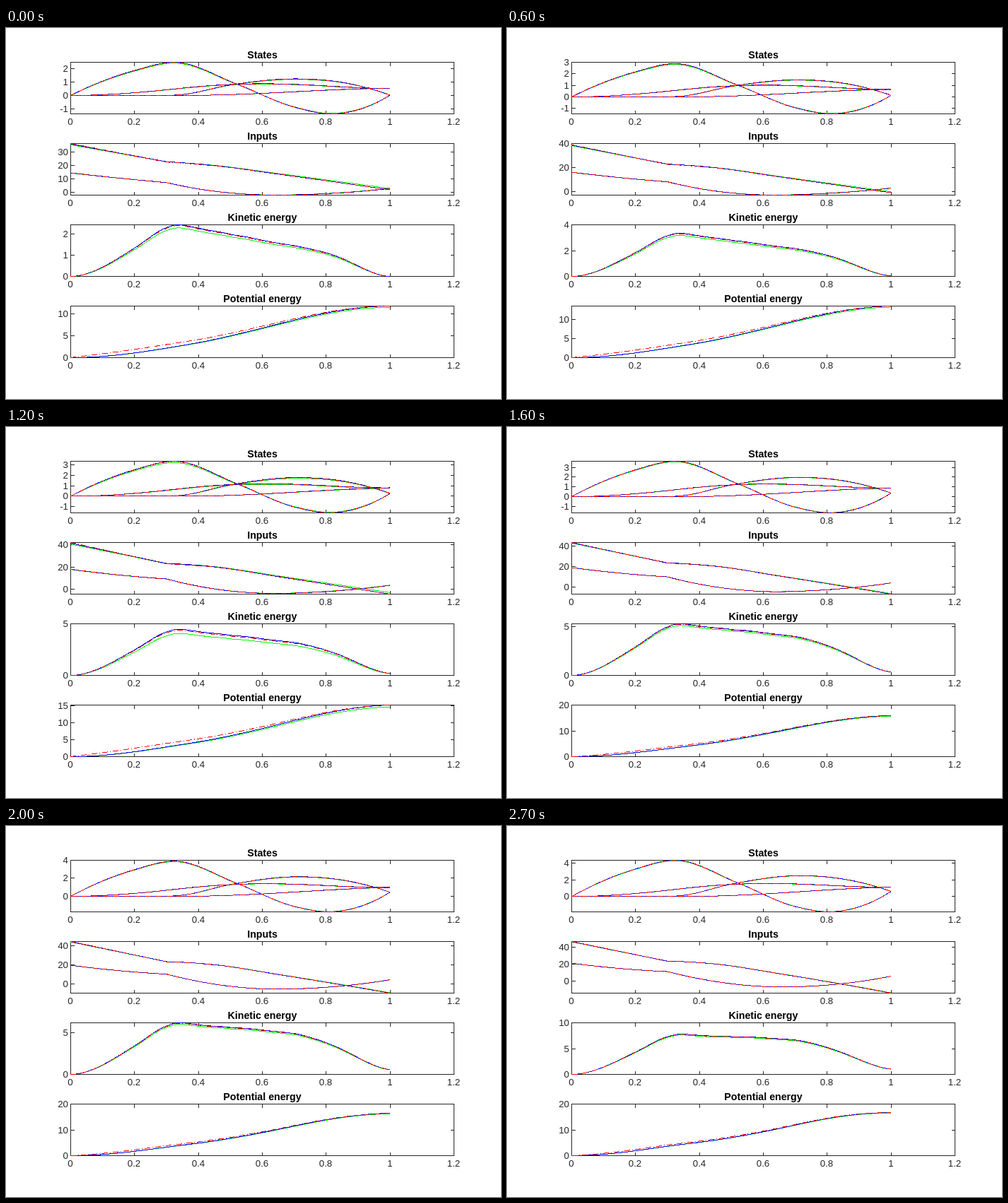
Recreate the animation shown at these times as an HTML page. Size 700 by 525 pixels, loop 2900 ms.

```html
<!DOCTYPE html>
<html lang="en">
<head>
<meta charset="utf-8">
<title>Two-link arm trajectories</title>
<style>
html, body { margin: 0; width: 700px; height: 525px; overflow: hidden; background: #fff; }
svg { display: block; }
path { fill: none; stroke-width: 1; shape-rendering: crispEdges; }
text { font: 13.3px "Liberation Sans", Arial, sans-serif; fill: #262626; text-anchor: middle; }
.title { font-weight: bold; font-size: 14.2px; fill: #000; }
.y { text-anchor: end; }
</style>
</head>
<body>
<svg id="stage" width="700" height="525"></svg>
<script>
const stage = document.getElementById('stage');
const LOOP = 2900, LAST = 26, N = 240;
const LEFT = 91.5, RIGHT = 633.5, HEIGHT = 73, UNIT = (RIGHT - LEFT) / 1.2;
const xs = Array.from({ length: N + 1 }, (_, i) => i / N);
const lerp = (a, b, t) => a + (b - a) * t;

// Smooth pieces through key points [x, value at the start, value at the end];
// pace holds the easing exponents at the left and right edge.
const speedA = {
  pace: [.93, 1],
  pieces: [[[0, 0, 0], [.2, 1.86, 3.33], [.325, 2.47, 4.38], [.52, .85, 1.65], [.7, -.87, -1.22],
    [.82, -1.37, -1.84], [1, .02, .62]]]
};
const speedB = {
  pace: [1, 1],
  pieces: [[[0, 0, 0], [.3, 0, 0]],
    [[.3, 0, 0], [.35, .07, .15], [.5, .78, 1.5], [.72, 1.23, 2.52], [.87, .89, 1.98], [1, .02, .62]]]
};
const inputA = {
  pace: [.8, 1.1],
  pieces: [[[0, 35.6, 47], [.3, 22.6, 23.7]],
    [[.3, 22.6, 23.7], [.45, 19.8, 20.3], [.65, 13.5, 8.7], [1, 1.9, -14.5]]]
};
const inputB = {
  pace: [.8, 2],
  pieces: [[[0, 14.4, 21.2], [.15, 10.6, 15], [.3, 7.3, 11.2]],
    [[.3, 7.3, 11.2], [.4, 2.6, 2.7], [.6, -1.8, -6.6], [.75, -1.4, -6.2], [1, 2.9, 5.7]]]
};

// Cubic through points, with tangents from neighbouring parabolas.
function spline(pts) {
  const h = [], slope = [], last = pts.length - 1;
  for (let i = 0; i < last; i++) {
    h[i] = pts[i + 1][0] - pts[i][0];
    slope[i] = (pts[i + 1][1] - pts[i][1]) / h[i];
  }
  const edge = (i, j) => j in h ? slope[i] + (slope[i] - slope[j]) * h[i] / (h[i] + h[j]) : slope[i];
  const tan = pts.map((_, i) =>
    i === 0 ? edge(0, 1) :
    i === last ? edge(last - 1, last - 2) :
    (slope[i - 1] * h[i] + slope[i] * h[i - 1]) / (h[i - 1] + h[i]));
  return x => {
    const i = Math.max(0, pts.findIndex(p => p[0] >= x) - 1);
    const t = (x - pts[i][0]) / h[i], u = 1 - t;
    return u * u * ((1 + 2 * t) * pts[i][1] + t * h[i] * tan[i]) +
      t * t * ((3 - 2 * t) * pts[i + 1][1] - u * h[i] * tan[i + 1]);
  };
}

function sample({ pace, pieces }, s) {
  const parts = pieces.map(points => ({
    end: points.at(-1)[0],
    at: spline(points.map(([x, a, b]) => [x, lerp(a, b, s ** lerp(...pace, x ** 3))]))
  }));
  return xs.map(x => parts.find(p => x <= p.end).at(x));
}

function integrate(ys) {
  let sum = 0;
  return ys.map((y, i) => sum += i ? (y + ys[i - 1]) / 2 / N : 0);
}

// The same curve from three models: two are slightly off the blue one.
const trio = (ys, green, red) => ({
  lime: ys.map((y, i) => green(y, xs[i])),
  blue: ys,
  red: ys.map((y, i) => red(y, xs[i]))
});

function buildPlots(step) {
  const s = step / LAST;
  const gap = .06 * Math.exp(-s) + .05 * Math.exp(-(((step - 11) / 1.5) ** 2));
  const scaled = (ys, g, r) => trio(ys, y => y * (1 - g * gap), y => y * (1 - r * gap));
  const input = (curve, w) => trio(sample(curve, s),
    (y, x) => y + w * gap * 24 * (x - .35),
    (y, x) => y + w * gap * 7 * Math.cos(9 * x) * (1 - x));
  const lift = x => (.35 + 8 * gap) * 4 * x * Math.exp(1 - 4 * x) * (1 - x ** 4);

  const va = sample(speedA, s), vb = sample(speedB, s);
  const qa = integrate(va), qb = integrate(vb);
  const kinetic = va.map((a, i) => .39 * a * a + 1.4 * vb[i] ** 2 + .9 * a * vb[i]);
  const potential = qa.map((a, i) => 14 * Math.sin(qb[i]) + 5.3 * Math.sin(a + qb[i]));
  return [
    { title: 'States', lines: [va, vb, qa, qb].map(ys => scaled(ys, .45, .1)),
      tick: (lo, hi) => hi - lo < 5.5 ? 1 : 2 },
    { title: 'Inputs', lines: [input(inputA, 1), input(inputB, .2)],
      tick: (lo, hi) => hi - lo < 41 ? 10 : 20 },
    { title: 'Kinetic energy', lines: [scaled(kinetic, 1, .25)], round: true,
      tick: (lo, hi) => hi < 3.2 ? 1 : hi <= 4 ? 2 : 5 },
    { title: 'Potential energy', round: true,
      lines: [trio(potential, y => y * (1 - .4 * gap), (y, x) => y + lift(x))],
      tick: (lo, hi) => hi < 20 ? 5 : 10 }
  ];
}

// Tight limits, widened to a round value when one is close.
function limits({ lines, tick, round }) {
  const all = lines.flatMap(l => Object.values(l).flat());
  let lo = Math.min(...all), hi = Math.max(...all);
  if (round) {
    lo = 0;
    hi = [4, 5, 10, 20].find(n => hi <= n && hi > .78 * n) || hi;
  } else {
    const d = tick(lo, hi), up = Math.ceil(hi / d) * d;
    if (up - hi < .03 * (hi - lo)) hi = up;
  }
  return [lo, hi, tick(lo, hi)];
}

const path = (d, color, dash = 'none') =>
  `<path d="${d}" stroke="${color}" stroke-dasharray="${dash}"/>`;
const text = (str, x, y, kind = 'x') => `<text class="${kind}" x="${x}" y="${y}">${str}</text>`;

function plotMarkup(plot, row) {
  const [lo, hi, d] = limits(plot), top = 48.5 + 115 * row, bottom = top + HEIGHT;
  const toY = v => bottom - (v - lo) / (hi - lo) * HEIGHT;
  let axes = `M${LEFT} ${top}H${RIGHT}V${bottom}H${LEFT}Z`;
  let labels = text(plot.title, 362.5, top - 5.5, 'title');

  for (let i = 0; i <= 6; i++) {
    const x = Math.floor(LEFT + i * .2 * UNIT) + .5;
    axes += `M${x} ${bottom}v-5M${x} ${top}v5`;
    labels += text(i / 5, x - .5, bottom + 15.5);
  }
  for (let n = Math.ceil(lo / d); n * d <= hi + 1e-6; n++) {
    const y = Math.floor(toY(n * d)) + .5;
    axes += `M${LEFT} ${y}h5M${RIGHT} ${y}h-5`;
    labels += text(n * d, 88, y + 4.5, 'y');
  }

  const curves = ['lime', 'blue', 'red'].map(color => plot.lines.map(line => {
    const points = line[color].map((v, i) => `${(LEFT + xs[i] * UNIT).toFixed(2)} ${toY(v).toFixed(2)}`);
    return path('M' + points.join('L'), color, color === 'red' ? '8 3 1 3' : 'none');
  }).join('')).join('');
  return path(axes, '#262626') + labels + curves;
}

let shown = -1;
function frame() {
  const t = performance.now() % LOOP;
  const step = Math.min(LAST, Math.max(0, Math.floor(t / 100) - 1));
  if (step !== shown) {
    shown = step;
    stage.innerHTML = buildPlots(step).map(plotMarkup).join('');
  }
  requestAnimationFrame(frame);
}
frame();
</script>
</body>
</html>
```
